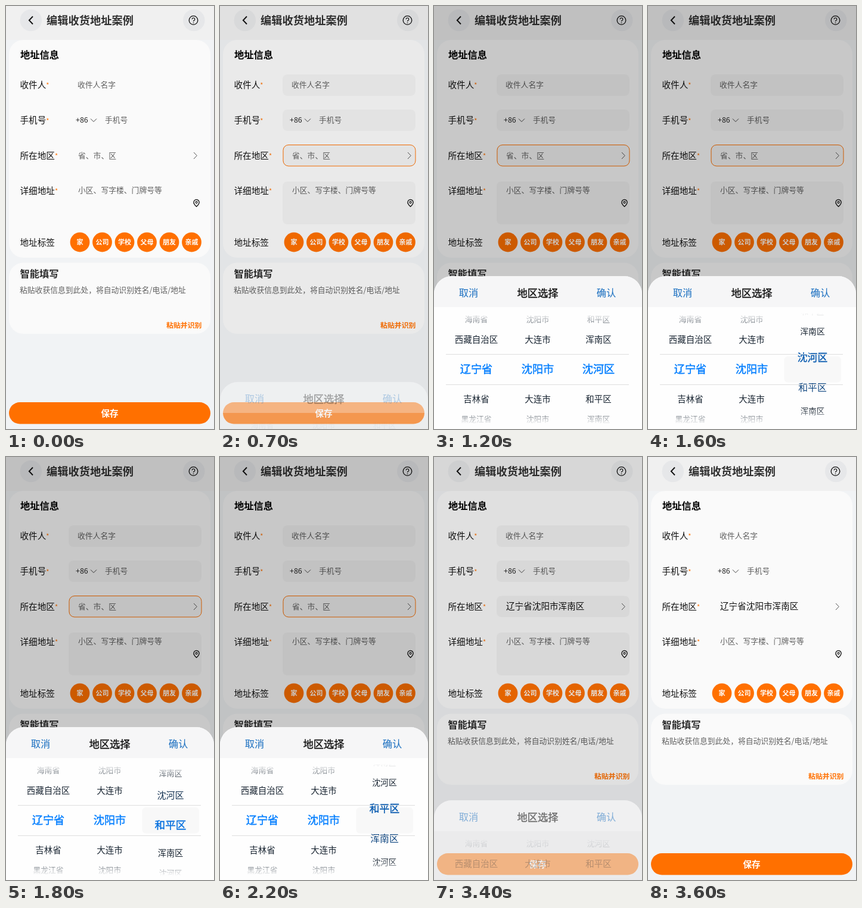
These frames come from a looping animation (349x711 px, 4000 ms). An HTML page with a canvas:

```html
<!DOCTYPE html>
<html lang="zh-CN">
<head>
<meta charset="utf-8">
<title>编辑收货地址案例</title>
<style>
html, body { margin: 0; width: 100%; height: 100%; overflow: hidden; background: #f1f3f5; }
canvas { display: block; width: 349px; height: 711px; }
</style>
</head>
<body>
<canvas id="stage"></canvas>
<script>
const W = 349, H = 711, LOOP = 4000, STEP = 100;
const SHEET_TOP = 454, SHEET_H = H - SHEET_TOP, MID = 610 - SHEET_TOP;
const WHEEL_HALF = 94, FADE = 29;
const ORANGE = '#ff7000', HINT = '#606060', INK = [24, 36, 49], BLUE = [0, 125, 255];
const FONT = '"Noto Sans CJK SC", "Noto Sans CJK", "Noto Sans", sans-serif';

const canvas = document.getElementById('stage');
const c = canvas.getContext('2d');
const scale = window.devicePixelRatio || 1;
canvas.width = W * scale;
canvas.height = H * scale;
c.scale(scale, scale);

const TAGS = ['家', '公司', '学校', '父母', '朋友', '亲戚'];
const FIELDS = [[115, 36], [174, 36], [233.5, 35.5], [295, 72]];
const WHEELS = [
  { x: 71, items: ['辽宁省', '吉林省', '黑龙江省', '海南省', '西藏自治区'] },
  { x: 174, items: ['沈阳市', '大连市'] },
  { x: 276, items: ['沈河区', '和平区', '浑南区'] }
];

const clamp = v => Math.min(1, Math.max(0, v));
const easeOut = (k, n) => 1 - Math.pow(1 - clamp(k), n);
const lerp = (a, b, k) => a + (b - a) * k;

// y is the middle of the glyphs; weight 500 is regular with a thin outline
function text(str, x, y, size, color, weight = 400, align = 'left') {
  const medium = weight === 500;
  c.font = `${medium ? 400 : weight} ${size}px ${FONT}`;
  c.fillStyle = c.strokeStyle = color;
  c.textAlign = align;
  c.textBaseline = 'alphabetic';
  c.fillText(str, x, y + size * 0.38);
  if (medium) {
    c.lineWidth = 0.4;
    c.strokeText(str, x, y + size * 0.38);
  }
}

function box(x, y, w, h, r, color) {
  c.beginPath();
  c.roundRect(x, y, w, h, r);
  c.fillStyle = color;
  c.fill();
}

function disc(x, y, r, color) {
  c.beginPath();
  c.arc(x, y, r, 0, Math.PI * 2);
  c.fillStyle = color;
  c.fill();
}

function stroke(width, color) {
  c.lineWidth = width;
  c.strokeStyle = color;
  c.stroke();
}

function line(points, width, color) {
  c.beginPath();
  points.forEach(([x, y]) => c.lineTo(x, y));
  stroke(width, color);
}

function ring(x, y, r, width) {
  c.beginPath();
  c.arc(x, y, r, 0, Math.PI * 2);
  stroke(width, '#111');
}

function drawTopBar() {
  box(0, 0, W, 57, 0, '#f0f0f0');
  disc(41.8, 24, 18.3, '#e6e7e9');
  line([[45, 17.5], [38.8, 24], [45, 30.5]], 1.9, '#111');
  text('编辑收货地址案例', 68, 24, 18.25, '#303030', 700);
  disc(315.3, 24, 18.3, '#e6e7e9');
  ring(314.5, 24, 7.3, 1.3);
  c.beginPath();
  c.arc(314.5, 22.3, 2.3, Math.PI, Math.PI * 2.3);
  c.quadraticCurveTo(314.5, 24.6, 314.5, 26);
  stroke(1.2, '#111');
  disc(314.5, 28.2, 0.8, '#111');
}

function drawPin() {
  c.beginPath();
  c.arc(319.6, 330, 4.6, Math.PI * 0.83, Math.PI * 2.17);
  c.quadraticCurveTo(322.5, 335, 319.6, 337.2);
  c.quadraticCurveTo(316.7, 335, 315.5, 332.3);
  c.closePath();
  stroke(1.3, '#111');
  ring(319.6, 330, 1.6, 1.1);
}

function drawLabel(str, y, required) {
  text(str, 23.5, y, 14.6, '#111');
  if (required) text('*', 23.5 + str.length * 14.6, y + 1, 11, ORANGE);
}

function drawForm(state) {
  box(5, 57, 338, 366, 24, '#fafafa');
  text('地址信息', 24, 82, 16.3, '#000', 700);

  if (state.dimmed) FIELDS.forEach(([y, h]) => box(105, y, 223, h, 8, '#f2f2f2'));
  if (state.focused) {
    c.beginPath();
    c.roundRect(106, 233.5, 222, 35.5, 9);
    stroke(1, ORANGE);
  }

  drawLabel('收件人', 132, true);
  text('收件人名字', 120, 132, 12.8, HINT);

  drawLabel('手机号', 191.5, true);
  text('+86', 117, 191.5, 12.4, '#222');
  line([[142, 189.5], [147, 194.5], [152, 189.5]], 1, '#444');
  text('手机号', 166, 191.5, 12.8, HINT);

  drawLabel('所在地区', 251, true);
  if (state.filled) text('辽宁省沈阳市浑南区', 121, 250.7, 14.6, '#111');
  else text('省、市、区', 121, 250.7, 12.8, HINT);
  line([[315, 246], [320.3, 251.5], [315, 257]], 1, '#555');

  drawLabel('详细地址', 310, true);
  text('小区、写字楼、门牌号等', 121, 309, 12.8, HINT);
  drawPin();

  drawLabel('地址标签', 397, false);
  TAGS.forEach((tag, i) => {
    const x = 124 + i * 37.5;
    disc(x, 397, 16.4, ORANGE);
    text(tag, x, 397, 11, '#fff', 700, 'center');
  });
}

function drawPaste() {
  box(5, 431.5, 338, 119.5, 24, '#fafafa');
  text('智能填写', 23.5, 450, 16.3, '#2a2a2a', 700);
  text('粘贴收获信息到此处，将自动识别姓名/电话/地址', 23, 477, 12.8, HINT);
  text('粘贴并识别', 328.5, 536.5, 11.9, ORANGE, 700, 'right');
}

// Ink that vanishes towards both ends of a wheel
function wheelInk(rgb) {
  const g = c.createLinearGradient(0, MID - WHEEL_HALF, 0, MID + WHEEL_HALF);
  const edge = FADE / (2 * WHEEL_HALF);
  [[0, 0], [edge, 1], [1 - edge, 1], [1, 0]].forEach(([stop, alpha]) =>
    g.addColorStop(stop, `rgba(${rgb},${alpha})`));
  return g;
}

function drawWheel(wheel, pos) {
  const n = wheel.items.length, near = Math.round(pos);
  for (let i = near - 3; i <= near + 3; i++) {
    const d = i - pos, a = Math.abs(d);
    const inner = Math.min(a, 1), outer = Math.max(a - 1, 0);
    const y = MID + Math.sign(d) * (50 * inner + 34 * outer);
    const size = lerp(18.2, 14.5, inner) - 1.7 * Math.min(outer, 1);
    const rgb = BLUE.map((v, j) => Math.round(lerp(v, INK[j], inner)));
    text(wheel.items[((i % n) + n) % n], wheel.x, y, size, wheelInk(rgb), a < 0.5 ? 500 : 400, 'center');
  }
}

function drawSheet(state) {
  const corners = [30, 30, 0, 0];
  c.save();
  c.translate(0, Math.round(H - SHEET_H * state.open));

  c.globalAlpha = state.open;
  box(0, 0, W, SHEET_H, corners, '#fefefe');
  box(0, 0, W, 52, corners, '#f6f6f7');
  text('取消', 58, 28, 16.3, '#1a6fc0', 400, 'center');
  text('地区选择', 174, 28, 17.3, '#151515', 500, 'center');
  text('确认', 289, 28, 16.3, '#1a6fc0', 400, 'center');

  // The wheels fade in on their own as well as with the sheet
  c.globalAlpha = state.open ** 2;
  if (state.pressed) box(228.5, 589 - SHEET_TOP, 95.5, 43.5, 6, '#f8f8f8');
  WHEELS.forEach((wheel, i) => drawWheel(wheel, i === 2 ? state.pos : 0));
  box(20, 585 - SHEET_TOP, 307, 1, 0, '#dedede');
  box(20, 636 - SHEET_TOP, 307, 1, 0, '#dedede');
  c.restore();
}

function stateAt(t) {
  const open = t < 3400 ? easeOut((t - 600) / 600, 2) : 1 - easeOut((t - 3300) / 300, 1.6);
  return {
    open: t < 700 ? 0 : open,
    dimmed: t >= 700 && t < 3600,
    focused: t >= 700 && t < 3400,
    filled: t >= 3400,
    pressed: t >= 1400,
    pos: easeOut((t - 1500) / 600, 2.64) + easeOut((t - 2100) / 600, 2.64)
  };
}

function draw(state) {
  box(0, 0, W, H, 0, '#f1f3f5');
  drawTopBar();
  drawForm(state);
  drawPaste();
  box(5, 666, 338, 36.5, 18.25, ORANGE);
  text('保存', 174, 684.3, 14.6, '#fff', 700, 'center');
  if (!state.open) return;

  box(0, 0, W, H, 0, `rgba(0,0,0,${0.2 * state.open})`);
  drawSheet(state);
}

const start = performance.now();
function tick() {
  const t = (performance.now() - start) % LOOP;
  draw(stateAt(Math.floor(t / STEP) * STEP));
  requestAnimationFrame(tick);
}
tick();
</script>
</body>
</html>
```
